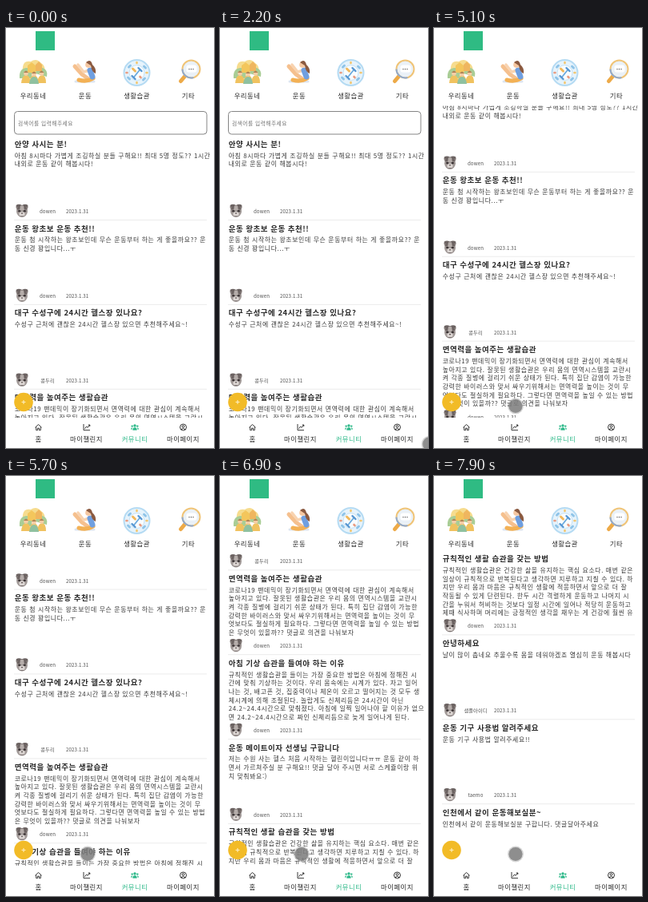
Recreate the animation shown at these times as an HTML page. Size 260x526 px, loop 8 s.

```html
<!DOCTYPE html>
<html lang="ko">
<head>
<meta charset="utf-8">
<style>
html, body { margin: 0; width: 100%; height: 100%; overflow: hidden; background: #fff; }
svg { display: block; width: 260px; height: 526px; font-family: "Noto Sans CJK KR", "Noto Sans CJK", "Noto Sans", sans-serif; }
.head { font-size: 9.5px; font-weight: 700; fill: #2a2a2a; letter-spacing: .5px; }
.body { font-size: 7.9px; fill: #3a3a3a; letter-spacing: .63px; }
.meta { font-size: 6.2px; fill: #505050; letter-spacing: .1px; }
.hint { font-size: 6.7px; fill: #707070; letter-spacing: .5px; }
.label { font-size: 8.4px; fill: #2a2a2a; letter-spacing: .45px; text-anchor: middle; }
</style>
</head>
<body>
<svg viewBox="0 0 260 526">
  <defs>
    <clipPath id="view"><rect y="97.5" width="260" height="390.5"/></clipPath>
    <g id="face">
      <ellipse cy="1" rx="7" ry="7.6" fill="#a09896"/>
      <path d="M-7.500-6.500Q-4-9 0-6.500 4-9 7.500-6.500L6-1-6-1z" fill="#6b6261"/>
      <path d="M-8-5l3 .5-1 4zM8-5l-3 .5 1 4z" fill="#857c7a"/>
      <path d="M-2-6h4l1 6h-6z" fill="#b5adaa"/>
      <ellipse cy="4.500" rx="3.600" ry="3" fill="#dcd6d3"/>
      <ellipse cx="-3.300" cy=".8" rx="1.700" ry="1.300" fill="#3b3435"/>
      <ellipse cx="3.300" cy=".8" rx="1.700" ry="1.300" fill="#3b3435"/>
      <path d="M-1.500 3h3L0 4.800zM-3.500 7Q0 8.500 3.500 7" fill="#5a5050"/>
    </g>
  </defs>
  <rect width="260" height="526" fill="#fff"/>

  <g clip-path="url(#view)"><g id="list">
    <rect x="10.5" y="104.5" width="240.5" height="28.5" rx="4" fill="#fff" stroke="#858585"/>
    <text class="hint" x="15" y="121.600">검색어를 입력해주세요</text>
  </g></g>

  <rect x="37" y="4" width="24" height="24" fill="#2fbb83"/>

  <g id="top">
    <!-- neighbourhood -->
    <g transform="translate(34 55)">
      <path d="M-13-6Q-12-15-3-13 4-18 10-11 16-8 14 2H-14z" fill="#f6dc8e"/>
      <path d="M-17 8Q-18-4-9-5T-2 8zM3 2Q5-8 12-5T17 6z" fill="#a9cd96"/>
      <path d="M-7-8l5-4 5 4v9H-7z" fill="#f3c65c"/>
      <path d="M3-9l4-4 4 4v8H3z" fill="#efb65f"/>
      <path d="M-15 14Q-14 4-9 4T-3 14zM-5 15Q-4 4 1 4T7 15zM5 14Q6 4 11 4T16 14z" fill="#f0c25f"/>
      <path d="M-5 15Q-4 6 1 6T7 15z" fill="#8fc1a0"/>
      <g fill="#f5cda6"><circle cx="-9" cy="2" r="2.800"/><circle cx="1" cy="3" r="2.800"/><circle cx="10.500" cy="2" r="2.800"/></g>
      <path d="M-12 1q3-5 6 0zM-2 2q3-5 6 0zM7.500 1q3-5 6 0z" fill="#b08457"/>
    </g>
    <!-- exercise -->
    <g transform="translate(99 55)" fill="none" stroke-linecap="round" stroke-linejoin="round">
      <path d="M-12 12H11" stroke="#dde5f1" stroke-width="3"/>
      <path d="M-13-7L-4 3 3 8" stroke="#f5c08e" stroke-width="5"/>
      <path d="M-9-9L-2 0 5-2" stroke="#f8d3b0" stroke-width="3.500"/>
      <path d="M-8 10Q2 13 10 8" stroke="#f3b155" stroke-width="5"/>
      <path d="M9 6L6-2" stroke="#6f9fe0" stroke-width="7"/>
      <circle cx="4" cy="-9" r="3.800" fill="#f5c7a1"/>
      <path d="M1-12Q7-17 9-9 14-5 13 2 8 0 7-8z" fill="#8b5a40"/>
    </g>
    <!-- habits -->
    <g transform="translate(163.500 56)">
      <circle r="16" fill="#e6f3fc" stroke="#b5dbf3" stroke-width="2"/>
      <circle r="9.500" fill="#f8fcff" stroke="#c6e2f4"/>
      <g fill="none" stroke-linecap="round">
        <path d="M-4 6L4-4" stroke="#6aa9dc" stroke-width="1.800"/>
        <path d="M-6 4l4 4M2-6l4 4" stroke="#5596d2" stroke-width="2.400"/>
        <path d="M-5-5l3 3" stroke="#f1b85b" stroke-width="3"/>
        <path d="M-10-7l2-2M9-8l2 2M-11 6l2 2M10 7l-2 2" stroke="#8fc4e8" stroke-width="3"/>
        <path d="M0-13v1M12 0h1M0 13v-1" stroke="#f3c670" stroke-width="2.600"/>
        <path d="M-13 0h1M4 5l1 1" stroke="#e99b80" stroke-width="2.600"/>
      </g>
    </g>
    <!-- others -->
    <g transform="translate(231.500 51.500)">
      <path d="M-8 9L-13 15" stroke="#edaa48" stroke-width="5" stroke-linecap="round"/>
      <circle r="11" fill="#eaf1f7" stroke="#f0c477" stroke-width="2"/>
      <path d="M-11 0A11 11 0 0 0 3 10.600" fill="none" stroke="#8fa9cf" stroke-width="2"/>
      <rect x="-6" y="-5" width="13" height="9" rx="3" fill="#fff"/>
      <g fill="#555"><circle cx="-2.500" r=".7"/><circle r=".7"/><circle cx="2.500" r=".7"/></g>
    </g>
  </g>

  <circle cx="22" cy="468.500" r="11.800" fill="#f2bb27"/>
  <path d="M19.500 468.500h5M22 466v5" stroke="#fdeec0" stroke-width="1.100"/>

  <g id="nav" fill="none" stroke="#222" stroke-width=".9" stroke-linejoin="round">
    <rect y="488" width="260" height="38" fill="#fff" stroke="none"/>
    <path d="M36.500 500.300L40.500 496.500 44.500 500.300M37.700 499.500v4.200h1.900v-2.500h1.800v2.500h1.900v-4.200"/>
    <path d="M97 496v7.700h8M98.500 501.800l2-2.700 1.700 1.300 2.500-3.400M102.800 497h2v2"/>
    <g fill="#2fb98a" stroke="none">
      <circle cx="161" cy="498" r="1.700"/><circle cx="157.700" cy="498.600" r="1.200"/><circle cx="164.300" cy="498.600" r="1.200"/>
      <path d="M158.300 503.700q0-3.400 2.700-3.400t2.700 3.400zM156 502.800q0-2.500 2.200-2.500l-.8 2.500zM166 502.800q0-2.500-2.200-2.500l.8 2.500z"/>
    </g>
    <circle cx="221.500" cy="500" r="4"/><circle cx="221.500" cy="499" r="1.400"/>
    <path d="M218.800 502.800q2.700-2.800 5.400 0"/>
  </g>

  <g id="touch">
    <circle r="10" fill="#aaa" opacity=".5"/>
    <circle r="8.500" fill="#777" opacity=".75"/>
  </g>
</svg>
<script>
const posts = [
  ["안양 사시는 분!", "dowen", "아침 8시마다 가볍게 조깅하실 분들 구해요!! 최대 5명 정도?? 1시간|내외로 운동 같이 해봅시다!"],
  ["운동 왕초보 운동 추천!!", "dowen", "운동 첨 시작하는 왕초보인데 무슨 운동부터 하는 게 좋을까요?? 운|동 신경 꽝입니다...ㅜ"],
  ["대구 수성구에 24시간 헬스장 있나요?", "콩두리", "수성구 근처에 괜찮은 24시간 헬스장 있으면 추천해주세요~!"],
  ["면역력을 높여주는 생활습관", "dowen", "코로나19 팬데믹이 장기화되면서 면역력에 대한 관심이 계속해서|높아지고 있다. 잘못된 생활습관은 우리 몸의 면역시스템을 교란시|켜 각종 질병에 걸리기 쉬운 상태가 된다. 특히 집단 감염이 가능한|강력한 바이러스와 맞서 싸우기위해서는 면역력을 높이는 것이 무|엇보다도 절실하게 필요하다. 그렇다면 면역력을 높일 수 있는 방법|은 무엇이 있을까?? 댓글로 의견을 나눠보자"],
  ["아침 기상 습관을 들여야 하는 이유", "dowen", "규칙적인 생활습관을 들이는 가장 중요한 방법은 아침에 정해진 시|간에 맞춰 기상하는 것이다. 우리 몸속에는 시계가 있다. 자고 일어|나는 것, 배고픈 것, 집중력이나 체온이 오르고 떨어지는 것 모두 생|체시계에 의해 조절된다. 놀랍게도 신체리듬은 24시간이 아닌|24.2~24.4시간으로 맞춰졌다. 아침에 일찍 일어나야 할 이유가 없으|면 24.2~24.4시간으로 짜인 신체리듬으로 늦게 일어나게 된다."],
  ["운동 메이트이자 선생님 구합니다", "dowen", "저는 수원 사는 헬스 처음 시작하는 헬린이입니다ㅠㅠ 운동 같이 하|면서 가르쳐주실 분 구해요!! 댓글 달아 주시면 서로 스케쥴이랑 위|치 맞춰봐요:)"],
  ["규칙적인 생활 습관을 갖는 방법", "dowen", "규칙적인 생활습관은 건강한 삶을 유지하는 핵심 요소다. 매번 같은|일상이 규칙적으로 반복된다고 생각하면 지루하고 지칠 수 있다. 하|지만 우리 몸과 마음은 규칙적인 생활에 적응하면서 앞으로 더 잘|작동될 수 있게 단련된다. 한두 시간 격렬하게 운동하고 나머지 시|간을 누워서 허비하는 것보다 일정 시간에 일어나 적당히 운동하고|제때 식사하며 머리에는 긍정적인 생각을 채우는 게 건강에 훨씬 유"],
  ["안녕하세요", "샘플아이디", "날이 많이 춥네요 추울수록 몸을 데워야겠죠 열심히 운동 해봅시다"],
  ["운동 기구 사용법 알려주세요", "taemo", "운동 기구 사용법 알려주세요!!"],
  ["인천에서 같이 운동해보실분~", "dowen", "인천에서 같이 운동해보실분 구합니다. 댓글달아주세요"]
];

const byId = id => document.getElementById(id);
const list = byId("list"), touch = byId("touch");

function add(parent, tag, attrs, text) {
  const el = document.createElementNS("http://www.w3.org/2000/svg", tag);
  for (const k in attrs) el.setAttribute(k, attrs[k]);
  if (text) el.textContent = text;
  parent.appendChild(el);
  return el;
}

posts.forEach(([title, user, body], i) => {
  const y = 145 + 105.9 * i;
  add(list, "text", { class: "head", x: 10.7, y: y + 3.6 }, title);
  body.split("|").forEach((line, n) =>
    add(list, "text", { class: "body", x: 10.7, y: y + 17.5 + 10.65 * n }, line));
  add(list, "use", { href: "#face", x: 20, y: y + 83.5 });
  add(list, "text", { class: "meta", x: 52, y: y + 87, "text-anchor": "middle" }, user);
  add(list, "text", { class: "meta", x: 75, y: y + 87 }, "2023.1.31");
  add(list, "rect", { x: 10, y: y + 95, width: 241, height: 1, fill: "#ececec" });
});

[["우리동네", 34], ["운동", 99], ["생활습관", 163.5], ["기타", 228]].forEach(([s, x]) =>
  add(byId("top"), "text", { class: "label", x, y: 88.3 }, s));
[["홈", 40.5], ["마이챌린지", 100.5], ["커뮤니티", 161], ["마이페이지", 221.5]].forEach(([s, x], i) =>
  add(byId("nav"), "text", { class: "label", x, y: 518, stroke: "none", style: i === 2 ? "fill:#2fb98a" : "" }, s));

// Keys are [time, ...values]; each span is eased by the given curve.
function track(keys, t, ease) {
  const n = keys.findIndex(k => k[0] > t);
  if (n === 0) return keys[0].slice(1);
  if (n < 0) return keys[keys.length - 1].slice(1);
  const a = keys[n - 1], b = keys[n];
  const p = ease((t - a[0]) / (b[0] - a[0]));
  return a.slice(1).map((v, i) => v + (b[i + 1] - v) * p);
}
const smooth = p => p * p * (3 - 2 * p);
const linear = p => p;

const scroll = [[4700, 0], [5300, 81], [5550, 81], [6200, 208.5], [6900, 334.5], [7900, 677]];
const path = [[2100, 274, 534], [2200, 262, 521], [2400, 229, 507], [3000, 112, 505],
  [3400, 64, 508], [4250, 64, 508], [4650, 102, 473.5]];

function draw(t) {
  const [y] = track(scroll, t, smooth);
  const [cx, cy] = track(path, t, linear);
  list.setAttribute("transform", `translate(0 ${-y})`);
  touch.setAttribute("transform", `translate(${cx} ${cy})`);
}

const start = performance.now();
function tick(now) {
  draw(Math.max(0, now - start) % 8000);
  requestAnimationFrame(tick);
}
draw(0);
requestAnimationFrame(tick);
</script>
</body>
</html>
```
